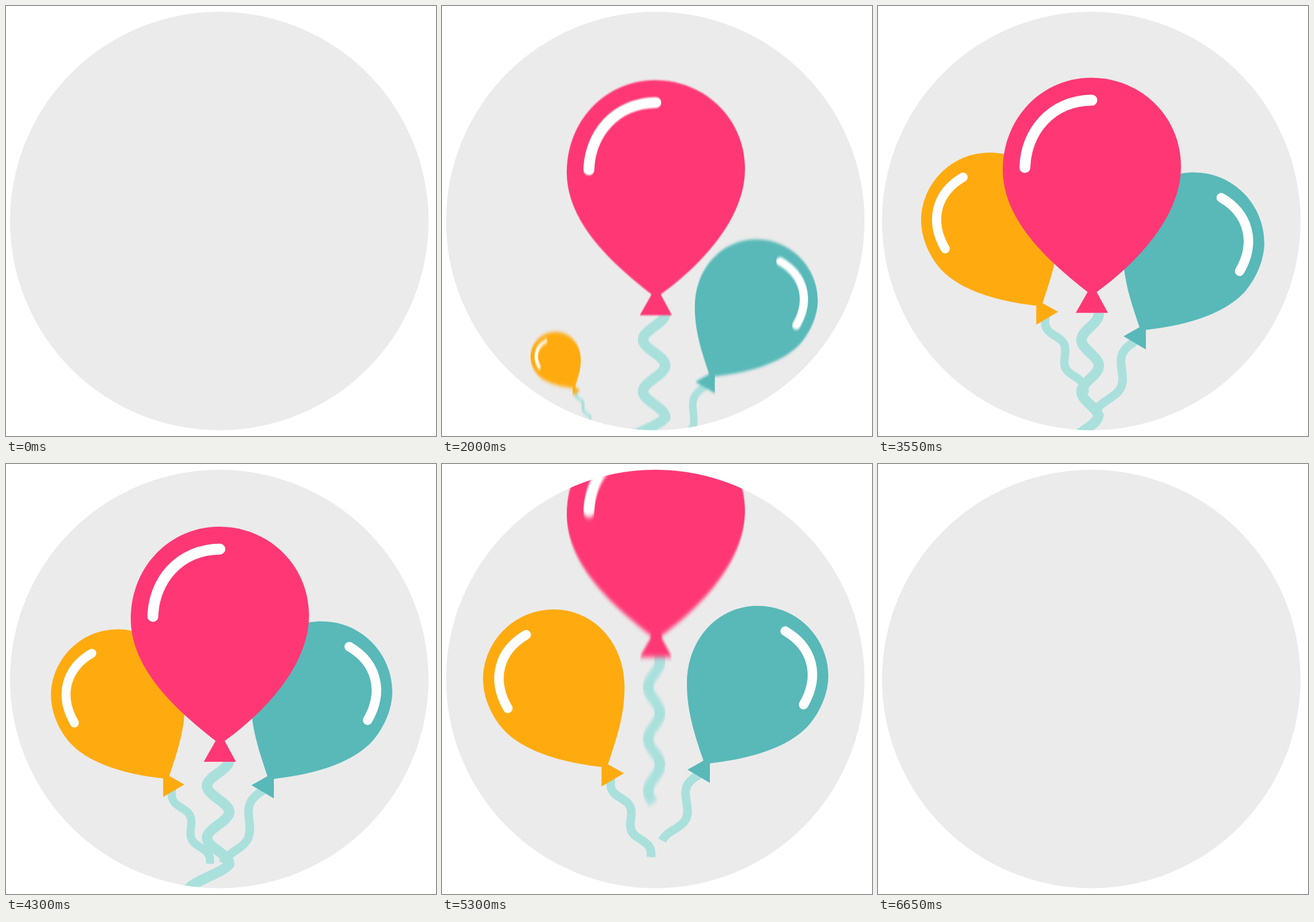
An HTML page that plays this animation: 748x748 px, repeating every 6750 ms.

```html
<!DOCTYPE html>
<html lang="en">
<head>
<meta charset="utf-8">
<title>Balloons</title>
<style>
  html, body { margin: 0; width: 100%; height: 100%; overflow: hidden; background: #fff; }
  svg { display: block; width: 100vw; height: 100vh; }
  .string { fill: none; stroke: #aae0dc; stroke-linejoin: round; }
  .shine { fill: none; stroke: #fff; stroke-linecap: round; }
</style>
</head>
<body>
<svg viewBox="0 0 748 748" xmlns="http://www.w3.org/2000/svg">
  <defs>
    <clipPath id="disc"><circle cx="371" cy="374" r="364"/></clipPath>
  </defs>
  <circle cx="371" cy="374" r="364" fill="#ebebeb"/>
  <g id="stage" clip-path="url(#disc)"></g>
</svg>
<script>
const LOOP = 6750, STEP = 50, LIFT = 5.5e-4;
const svg = document.querySelector('svg');
const stage = document.getElementById('stage');

function add(parent, tag, attrs = {}) {
  const node = document.createElementNS(svg.namespaceURI, tag);
  for (const name in attrs) node.setAttribute(name, attrs[name]);
  return parent.appendChild(node);
}

const lerp = (a, b, k) => a + (b - a) * k;

function ease(t, from, to) {
  const u = Math.max(0, Math.min(1, (t - from) / (to - from)));
  return u * u * (3 - 2 * u);
}

// Monotone cubic curve through [time, value] points, held at both ends.
function curve(points) {
  const last = points.length - 1;
  const slope = i => (points[i + 1][1] - points[i][1]) / (points[i + 1][0] - points[i][0]);
  const tangent = i => {
    if (i === 0) return slope(0);
    if (i === last) return 0;
    const a = slope(i - 1), b = slope(i);
    return a * b <= 0 ? 0 : 2 * a * b / (a + b);
  };
  return t => {
    if (t <= points[0][0]) return points[0][1];
    if (t >= points[last][0]) return points[last][1];
    const i = points.findIndex(p => p[0] > t) - 1;
    const h = points[i + 1][0] - points[i][0], u = (t - points[i][0]) / h, w = 1 - u;
    return lerp(points[i][1], points[i + 1][1], u * u * (3 - 2 * u))
      + h * u * w * (tangent(i) * w - tangent(i + 1) * u);
  };
}

// A sine wave laid along a line; swaying widens it and curls its tail.
function wave({ from, to, amp, cycles, phase, swing = 0, curl = 0, stretch = 0 }, sway) {
  const dx = to[0] - from[0] - stretch / 2 * sway, dy = to[1] - from[1] + stretch * sway;
  const length = Math.hypot(dx, dy), points = [];
  for (let u = 0; u <= 1.001; u += 1 / 48) {
    const side = (amp + swing * sway) * Math.sin(2 * Math.PI * cycles * u + phase + swing * sway / 13);
    const tail = curl * sway * Math.max(0, u - .71);
    points.push([from[0] + dx * u + side * dy / length - tail,
                 from[1] + dy * u - side * dx / length]);
  }
  return 'M' + points.join('L');
}

const SIDE = {
  body: 'M455 270C440 225 426 185 426 135C426 58 480 0 549 0C620 0 672 58 672 122' +
        'C672 150 660 180 641 204C605 248 530 267 466 274Z',
  knot: 'M427 285L466 263V308Z',
  shine: 'M597 44C645 72 658 122 629 172',
  shineWidth: 16.5, stringWidth: 15
};

const balloons = [
  {
    ...SIDE, color: '#ffab10', flip: 'matrix(-1 0 0 1 743.5 0)', cx: 194.5, drift: 5,
    string: { from: [294, 292], to: [361, 432], amp: 8, cycles: 1.94, phase: Math.PI },
    small: .376, grow: [2100, 2887], shrink: .053,
    start: 1650, leave: 5500, end: 6650,
    top: curve([[1650, 715], [2000, 567], [2500, 330], [2800, 249], [3100, 238], [4250, 288], [5000, 253]])
  },
  {
    ...SIDE, color: '#58b9b8', cx: 549.5, drift: -18,
    string: { from: [447, 294], to: [393, 413], amp: 11, cycles: 1.25, phase: Math.PI, stretch: 12 },
    small: .36, grow: [1450, 2225], shrink: 0,
    start: 1500, leave: 5250, end: 6500,
    top: curve([[1450, 700], [2000, 406], [2700, 228], [3600, 290], [5250, 248]])
  },
  {
    color: '#ff3875', cx: 371.5, drift: 0, shineWidth: 19, stringWidth: 18,
    body: 'M365 373C300 322 217 250 217 160C217 70 285 0 371 0C455 0 527 65 527 155' +
          'C527 235 460 315 380 373Z',
    knot: 'M365 372L344 409H400L380 372Z',
    shine: 'M255.5 156C257 95 300 40 372 39',
    string: { from: [369, 405], to: [369, 662], amp: 10.5, cycles: 2.85, phase: .8, swing: 9, curl: 200 },
    small: .355, grow: [1150, 1654], shrink: 0,
    start: 800, leave: 4700, end: 6150,
    top: curve([[800, 729], [1200, 553], [1450, 355], [2000, 129], [2650, 50], [3750, 132], [4300, 109], [4700, 125]])
  }
];

const sway = curve([[2000, 1], [2750, 0], [4300, 1], [5300, 0]]);

// Height of a balloon: its drifting, then a steady acceleration upwards.
const topAt = (b, t) => b.top(t) - LIFT * Math.max(0, t - b.leave) ** 2;

balloons.forEach((b, i) => {
  const filter = add(svg.querySelector('defs'), 'filter', {
    id: 'blur' + i, filterUnits: 'userSpaceOnUse', x: -50, y: -80, width: 850, height: 900,
    'color-interpolation-filters': 'sRGB'
  });
  b.blur = add(filter, 'feGaussianBlur');
  b.filter = `url(#blur${i})`;
  b.outer = add(stage, 'g');
  b.inner = add(b.outer, 'g');
  b.line = add(b.inner, 'path', { class: 'string', 'stroke-width': b.stringWidth });
  const shape = add(b.inner, 'g', b.flip ? { transform: b.flip } : {});
  add(shape, 'path', { d: b.body, fill: b.color });
  add(shape, 'path', { d: b.knot, fill: b.color });
  add(shape, 'path', { d: b.shine, class: 'shine', 'stroke-width': b.shineWidth });
});

function render(t) {
  const swaying = sway(t);
  for (const b of balloons) {
    const visible = t >= b.start && t < b.end;
    b.outer.setAttribute('visibility', visible ? 'visible' : 'hidden');
    if (!visible) continue;
    const size = lerp(b.small, 1, ease(t, ...b.grow)) * (1 - b.shrink * swaying);
    const x = b.cx + b.drift * (1 - size);
    b.inner.setAttribute('transform',
      `translate(${x} ${topAt(b, t)}) scale(${size}) translate(${-b.cx} 0)`);
    b.line.setAttribute('d', wave(b.string, swaying));

    // Vertical motion blur over half a step of travel.
    const travel = Math.abs(topAt(b, t + STEP / 4) - topAt(b, t - STEP / 4));
    const spread = travel / Math.sqrt(12);
    if (spread > .7) {
      b.blur.setAttribute('stdDeviation', `0 ${spread}`);
      b.outer.setAttribute('filter', b.filter);
    } else {
      b.outer.removeAttribute('filter');
    }
  }
}

const began = performance.now();
function tick() {
  const t = (performance.now() - began) % LOOP;
  render(Math.floor(t / STEP) * STEP);
  requestAnimationFrame(tick);
}
tick();
</script>
</body>
</html>
```
